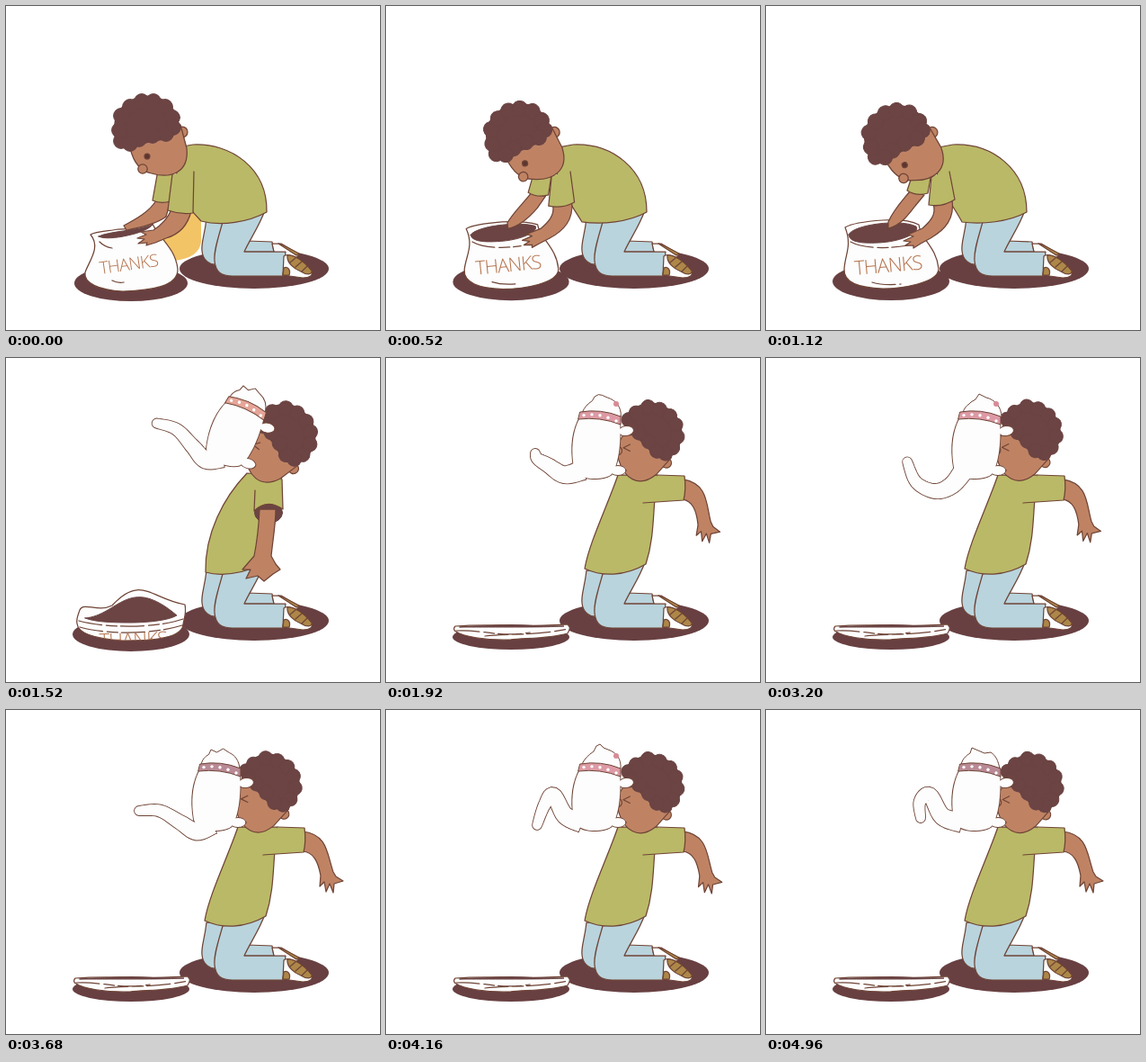
Recreate the animation shown at these times as an HTML page. Size 416 px wide and 360 px high, loop 5040 ms.

```html
<!DOCTYPE html>
<html lang="en">
<head>
<meta charset="utf-8">
<title>Thanks</title>
<style>
html, body { margin: 0; width: 100%; height: 100%; overflow: hidden; background: #fff; }
svg { display: block; width: 416px; height: 360px; }
path, ellipse, circle { stroke: #6f4436; stroke-width: 1.25; stroke-linejoin: round; stroke-linecap: round; }
.shade { fill: #684042; stroke: none; }
.jeans { fill: #b9d4dd; }
.skin { fill: #bf8364; }
.shirt { fill: #bab967; }
.white { fill: #fdfdfd; }
.gold { fill: #ad8748; }
.hair { fill: #6b4443; stroke: #6b4443; stroke-width: 1; }
.mop { fill: #6b4443; stroke: #6b4443; stroke-width: 13; }
.line { fill: none; }
.plain { stroke: none; }
#cat path, #cat ellipse { stroke-width: 1; }
#cat .plain, #dots circle { stroke: none; }
#cat #outline { stroke-width: 1.8; }
#folds { stroke-dasharray: 26 5 12 4; }
text { font: 300 22px "Open Sans", sans-serif; letter-spacing: -1px; fill: #b5734d; }
</style>
</head>
<body>
<svg viewBox="0 0 416 360">
  <defs><clipPath id="inBag"><path id="bagClip"/></clipPath></defs>
  <ellipse class="shade" cx="276" cy="292" rx="83" ry="22"/>
  <ellipse class="shade" id="bagShade" cx="139"/>
  <path id="cloth" class="plain" fill="#f3c466" d="M175 240L208 222L217 240V262Q215 280 187 283L172 265Z"/>

  <g id="legs">
    <path class="jeans" d="M223 236C221 255 217 262 218 272C219 283 227 288 234 287L244 238Z"/>
    <path class="jeans" d="M268 261L296 262L298 273H264Z"/>
    <path class="white" d="M296 264L306 264L326 276L322 281L298 273Z"/>
    <path class="gold" d="M303 264L307 265L326 275L323 277Z"/>
    <path class="jeans" d="M241 240C236 258 231 272 232 283C233 296 240 300 252 300H308L311 273H265C272 258 282 244 288 227Z"/>
    <path class="white" d="M309 278C312 275 318 277 322 280L340 294C342 299 338 302 330 302L308 299Z"/>
    <path class="gold" d="M313 277C320 276 331 283 340 294C341 299 334 299 328 295C320 292 312 285 313 277Z"/>
    <path class="gold" d="M309 291C313 289 317 293 315 299L308 299Z"/>
    <path class="line" d="M316 285L322 280M322 290L329 284M329 295L335 289"/>
  </g>

  <path id="bag" class="white"/>
  <path id="mouth" class="hair"/>
  <path id="folds" class="line"/>
  <g clip-path="url(#inBag)"><text id="word">THANKS</text></g>

  <g id="far"><path id="farArm" class="skin"/><path id="farSleeve" class="shirt"/></g>
  <path id="shirt" class="shirt"/>
  <ellipse id="cuff" class="hair" cx="292" cy="172" rx="15.5" ry="11.5"/>
  <path id="arm" class="skin"/>
  <path id="sleeve" class="shirt"/>

  <g id="head">
    <circle class="skin" cx="2" cy="0" r="6"/>
    <path class="skin" d="M-56 18C-52 34 -44 44 -32 46C-12 52 10 46 7 18L0 -8L-40 -14Z"/>
    <circle id="eye" cx="-37" cy="27" r="3" fill="#5c352f"/>
    <path id="squint" class="line" d="M4 -4L-4 0L4 4" transform="translate(-39 30) rotate(-57)"/>
    <circle id="nose" class="skin" cx="-42" cy="41" r="5.2"/>
    <g id="hair"></g>
  </g>

  <g id="cat">
    <path id="outline" class="line"/>
    <ellipse class="white" cx="267" cy="81" rx="8.5" ry="5.5" transform="rotate(-8 267 81)"/>
    <ellipse class="white" cx="258" cy="125" rx="9" ry="5.5"/>
    <path id="tail" class="white plain"/>
    <path id="torso" class="white plain" d="M217 64C206 82 206 105 209 122C213 137 240 136 250 130C258 122 262 95 260 70Z"/>
    <path id="nape" class="white"/>
    <circle id="inner" class="plain" cx="256" cy="51" r="3" fill="#d98a96"/>
    <path id="collar" d="M216 60Q239 56 261 65L261 74Q238 65 214 68Z"/>
    <g id="dots" fill="#fff"></g>
  </g>
</svg>
<script>
const $ = id => document.getElementById(id);
const set = (id, name, value) => $(id).setAttribute(name, value);
const show = (id, on) => set(id, 'visibility', on ? 'visible' : 'hidden');
const NUM = /-?\d*\.?\d+/g;
const nums = s => s.match(NUM).map(Number);

// Blend every number of one string towards another
function mix(a, b, k) {
  const to = nums(b);
  let i = 0;
  return a.replace(NUM, x => +(+x + (to[i++] - x) * k).toFixed(3));
}

const smooth = k => k * k * (3 - 2 * k);

function track(times, poses, t, ease = k => k) {
  if (t <= times[0]) return poses[0];
  for (let i = 1; i < times.length; i++) {
    if (t < times[i]) {
      return mix(poses[i - 1], poses[i], ease((t - times[i - 1]) / (times[i] - times[i - 1])));
    }
  }
  return poses[poses.length - 1];
}

// Four key poses: kneeling, peeking, struck, struggling
const BODY_TIMES = [120, 680, 1120, 1440, 1520, 1680];
const BAG_TIMES = [120, 680, 1200, 1520, 1760];

const body = {
  shirt: [
    'M197 156C178 188 200 222 217 239C240 245 270 240 290 229C291 180 250 152 208 154Z',
    'M192 157C180 190 205 215 218 240C240 243 270 240 290 229C290 180 250 152 208 154Z',
    'M268 128C242 155 221 195 222 238C240 243 262 240 290 228C296 205 300 175 307 130Z',
    'M258 130C246 165 226 205 221 234C240 243 265 243 289 229C300 195 296 165 302 130Z'],
  sleeve: [
    'M185 187L180 227Q194 232 208 230L209 184',
    'M184 189L181 221Q196 224 210 215L204 184',
    'M277 147L276 170Q290 156 308 168L307 135',
    'M286 161L331 158Q334 146 332 131L302 130'],
  arm: [
    'M184 226C180 236 172 244 164 249L150 251L156 254L146 258L154 259L147 264L157 263L156 266L166 263L178 258C192 254 202 244 206 228Z',
    'M186 220C190 232 182 240 174 247L158 254L164 256L153 261L161 262L155 266L164 266L164 269L172 264L183 258C200 248 210 236 207 215Z',
    'M282 168C281 190 279 205 276 220L263 235L272 235L267 245L280 242L287 248L297 240L305 235L300 229L295 220C297 200 300 185 300 168Z',
    'M330 157C342 158 347 168 350 184L349 196L354 191L356 202L360 193L364 203L365 193L375 190L367 185L364 180C357 160 358 138 330 135Z'],
  head: ['194 140 0 1', '183 141 -15 1', '319 121 68 .96', '308 114 57 .93']
};

const bag = {
  bag: [
    'M94 254C100 250 115 250 125 248C140 248 152 246 163 242C170 258 188 268 191 292C192 312 160 316 130 317C104 316 86 308 88 296C92 284 106 268 94 254Z',
    'M88 246C96 241 115 239 130 238C148 237 162 239 170 243C171 258 190 268 192 292C192 308 150 314 130 314C104 313 86 308 87 292C88 276 96 266 88 246Z',
    'M81 283C84 268 100 284 118 275C150 240 162 268 199 274C201 283 198 290 197 296C196 314 150 314 130 314C100 312 80 306 79 295C78 290 80 286 81 283Z',
    'M77 298C100 296 120 297 135 297C160 298 180 297 202 296C206 300 204 302 202 306C180 312 155 311 138 313C110 314 85 309 78 304C75 303 75 300 77 298Z'],
  mouth: [
    'M103 256C115 250 145 250 163 243C160 247 150 252 135 255C122 258 108 259 103 256Z',
    'M92 254C96 243 150 236 167 245C172 252 150 262 125 263C105 264 92 262 92 254Z',
    'M88 289C125 286 136 240 190 286C180 292 155 294 138 294C115 294 98 293 88 289Z',
    'M82 299C105 297 150 297 198 298C180 299 155 299 138 299C115 299 98 299 82 299Z'],
  folds: [
    'M104 262C108 266 112 268 118 269M118 305C122 307 126 308 131 307',
    'M94 262C105 268 128 271 158 266M118 307C128 310 140 310 150 309',
    'M81 292C110 300 165 301 197 290M82 299C110 307 160 308 196 297',
    'M78 303C105 301 125 311 160 305M110 309C135 306 165 309 202 301'],
  word: ['105 298 -8 .87', '99 299 -5 1', '104 322 -2 1', '104 335 0 1'],
  shade: ['308 63 20', '306 65 21', '307 65 19', '310 65 14']
};

const far = {
  farArm: [
    'M167 216C160 228 146 236 131 244L134 249C150 246 168 242 178 234L183 217Z',
    'M160 206C152 216 142 226 136 240L136 247C150 244 160 230 166 222L176 210Z'],
  farSleeve: [
    'M168 188L163 216Q172 220 183 217L186 188',
    'M162 190L157 205Q168 212 180 208L184 185']
};

const LEAP_TIMES = [1280, 1360, 1440, 1520, 1680];
const leap = ['-53 82 30', '-8 6 20', '6 -12 18', '10 -17 17', '0 0 0'];

// Tail wag: spine from tip to rump over one swing
const SWING = 720;
const TAIL_TIMES = [0, 80, 200, 320, 400, 560, SWING];
const tail = [
  '147 125 165 134 190 143 208 137 222 122',
  '157 115 167 138 188 148 207 141 222 122',
  '165 95 165 115 178 132 198 136 220 124',
  '168 128 176 106 186 94 199 117 218 125',
  '172 120 171 102 182 94 196 118 218 125',
  '148 112 171 112 194 125 212 135 229 127'];
tail.push(tail[0]);

const NAPE_TIMES = [0, 80, 320, 400, SWING];
const nape = [
  'M217 61C218 55 221 52 224 51L227 46L233 49L240 38L247 48C254 50 260 56 260 65',
  'M219 61C220 56 223 53 226 51L228 49L233 46L237 40L245 44C254 46 262 54 262 65',
  'M218 60C221 54 225 50 231 46L234 40L238 38L242 42L247 44C256 47 262 54 261 65',
  'M217 61C218 55 222 51 227 48L229 42L236 45L243 48L250 47C256 51 258 56 260 65'];
nape.push(nape[0]);

function spline(p, u) {
  const i = Math.min(Math.floor(u), p.length - 2), f = u - i;
  const at = n => p[Math.max(0, Math.min(p.length - 1, n))];
  return [0, 1].map(c => {
    const [a, b, d, e] = [at(i - 1), at(i), at(i + 1), at(i + 2)].map(q => q[c]);
    return b + f / 2 * (d - a + f * (2 * a - 5 * b + 4 * d - e + f * (3 * (b - d) + e - a)));
  });
}

function tailPath(flat) {
  const n = nums(flat), spine = [], left = [], right = [];
  for (let i = 0; i < n.length; i += 2) spine.push([n[i], n[i + 1]]);
  const end = spine.length - 1;
  for (let i = 0; i <= 32; i++) {
    const u = i / 32 * end, w = 5 + 6 * i / 32;
    const [x, y] = spline(spine, u);
    const a = spline(spine, Math.max(0, u - .05)), b = spline(spine, Math.min(end, u + .05));
    const dx = b[0] - a[0], dy = b[1] - a[1], k = w / (Math.hypot(dx, dy) || 1);
    left.push(`${(x - dy * k).toFixed(1)} ${(y + dx * k).toFixed(1)}`);
    right.unshift(`${(x + dy * k).toFixed(1)} ${(y - dx * k).toFixed(1)}`);
  }
  return `M${left.concat(right).join('L')}A5 5 0 0 0 ${left[0]}Z`;
}

// Curls around the hairline, relative to the ear
const curls = nums('-66 10 -68 -2 -66 -18 -56 -28 -43 -34 -30 -34 -17 -28 -9 -16 -8 -5 -16 2 -31 4 -46 8 -56 13');
let mop = `<path class="mop" d="M${curls.join(' ')}Z"/>`;
for (let i = 0; i < curls.length; i += 2) {
  mop += `<circle class="hair" cx="${curls[i]}" cy="${curls[i + 1]}" r="8.4"/>`;
}
$('hair').innerHTML = mop;

$('dots').innerHTML = [0, 1, 2, 3, 4].map(i =>
  `<circle cx="${220 + i * 9}" cy="${63.6 - 1.4 * Math.sin(i * .9) + i * i * .36}" r="1.7"/>`).join('');

const torso = $('torso').getAttribute('d');

function draw(t) {
  const bodyAt = ([a, b, c, d]) => track(BODY_TIMES, [a, b, b, c, c, d], t, smooth);
  const bagAt = ([a, b, c, d]) => track(BAG_TIMES, [a, b, b, c, d], t, smooth);
  const phase = (t - 2400 + SWING * 4) % SWING;
  const turn = phase / SWING * 2 * Math.PI;
  const held = t >= 1680;

  for (const id of ['shirt', 'sleeve', 'arm']) set(id, 'd', bodyAt(body[id]));
  for (const id of ['bag', 'mouth', 'folds']) set(id, 'd', bagAt(bag[id]));
  for (const id in far) set(id, 'd', track([120, 680], far[id], t, smooth));
  set('bagClip', 'd', bagAt(bag.bag));

  const [x, y, r, s] = nums(bagAt(bag.word));
  set('word', 'transform', `translate(${x} ${y}) rotate(${r}) scale(${s})`);
  const [cy, rx, ry] = nums(bagAt(bag.shade));
  set('bagShade', 'cy', cy);
  set('bagShade', 'rx', rx);
  set('bagShade', 'ry', ry);

  const sway = held ? 1.5 + 1.5 * Math.sin(turn - Math.PI / 4) : 0;
  const [hx, hy, hr, hs] = nums(bodyAt(body.head));
  set('head', 'transform', `translate(${hx + sway} ${hy + sway / 3}) rotate(${hr}) scale(${hs})`);
  set('arm', 'transform', `rotate(${held ? 5 * Math.max(0, Math.sin(turn)) : 0} 331 146)`);

  show('cloth', t < 200);
  show('far', t < 1200);
  show('cuff', t >= 1440 && t < 1600);
  show('eye', t < 1280);
  show('squint', t >= 1280);
  show('cat', t >= 1280);

  const [cx, cdy, cr] = nums(track(LEAP_TIMES, leap, t));
  const lively = phase >= 80 && phase < 400;
  const wag = tailPath(track(TAIL_TIMES, tail, phase));
  set('cat', 'transform', `translate(${cx} ${cdy}) rotate(${cr} 228 133)`);
  set('tail', 'd', wag);
  set('outline', 'd', wag + torso);
  set('nape', 'd', track(NAPE_TIMES, nape, phase));
  set('collar', 'fill', t < 1680 ? '#e5a598' : lively ? '#dd9aa5' : '#b98a95');
  set('inner', 'opacity', held && lively ? 1 : 0);
}

// Two long holds, otherwise 80 ms steps
function step(t) {
  if (t < 200) return 0;
  const from = t < 880 ? 200 : 880;
  const s = from + Math.floor((t - from) / 80) * 80;
  return t < 880 ? Math.min(s, 680) : s;
}

const start = performance.now();
let last = -1;
function tick() {
  const t = step((performance.now() - start) % 5040);
  if (t !== last) draw(last = t);
  requestAnimationFrame(tick);
}
tick();
</script>
</body>
</html>
```
